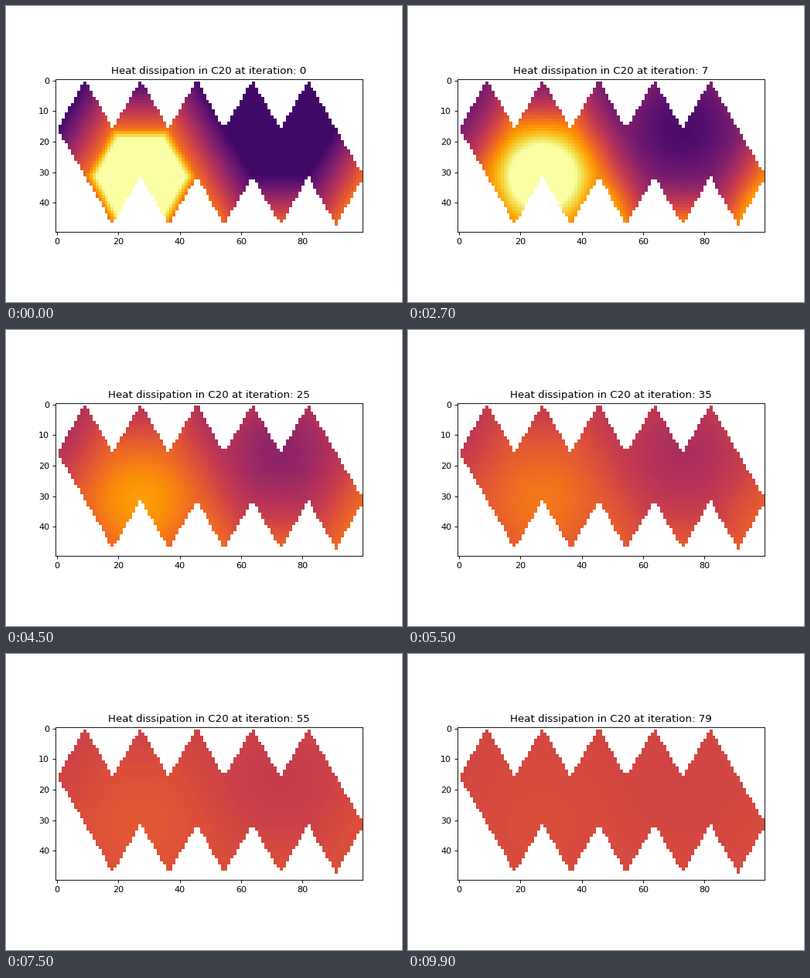
Recreate the animation shown at these times as a matplotlib script. Size 512 px wide and 384 px high, loop 10000 ms.

```python
import numpy as np
import matplotlib.pyplot as plt
from matplotlib.animation import FuncAnimation

COLS, ROWS = 100, 50
FRAMES, HOLD, INTERVAL = 100, 20, 100
EDGE = COLS / 5.5            # side of a face, in cells
TALL = EDGE * np.sqrt(3) / 2
N = 18                       # mesh divisions per side
DIFFUSION = 5.47             # cells squared per iteration
SUBSTEPS = 30

# Corner ids of the icosahedron: two poles and two rings of five.
NORTH, SOUTH = 0, 11
HOT, HOT_RING = 7, (2, 3, 6, 8, SOUTH)


def upper(i):
    return 1 + i % 5


def lower(i):
    return 6 + i % 5


def corner_heat(v):
    if v == HOT:
        return 2.3
    return 0.68 if v in HOT_RING else 0.2


def net_faces():
    """Yield (corner ids, flat corner positions) for the unfolded net."""
    for i in range(5):
        x = i * EDGE
        n = (NORTH, (x + EDGE / 2, 0))
        u0, u1 = (upper(i), (x, TALL)), (upper(i + 1), (x + EDGE, TALL))
        l0 = (lower(i), (x + EDGE / 2, 2 * TALL))
        l1 = (lower(i + 1), (x + EDGE * 1.5, 2 * TALL))
        s = (SOUTH, (x + EDGE, 3 * TALL))
        for face in ((n, u0, u1), (u0, u1, l0), (u1, l0, l1), (l0, l1, s)):
            ids, pos = zip(*face)
            yield ids, np.array(pos)


points = {}


def point_id(ids, weights):
    """Index of a mesh point; shared edges of faces give the same key."""
    key = tuple(sorted((v, int(w)) for v, w in zip(ids, weights) if w > 0))
    return points.setdefault(key, len(points))


UNIT = np.eye(3, dtype=int)
faces = list(net_faces())


def build_neighbours():
    links = {}
    for ids, _ in faces:
        for a in range(N):
            for b in range(N - a):
                base = np.array([a, b, N - 1 - a - b])
                tri = [point_id(ids, base + e) for e in UNIT]
                for p in tri:
                    links.setdefault(p, set()).update(q for q in tri if q != p)
    # Five-way corners are padded with themselves.
    return np.array([(list(links[p]) + [p])[:6] for p in range(len(links))])


def build_sampler():
    """Cells inside the net, with three mesh points and weights for each."""
    inverses = [np.linalg.inv(np.vstack([pos.T, np.ones(3)]))
                for _, pos in faces]
    cells, index, weight = [], [], []
    for r in range(ROWS):
        for c in range(COLS):
            bary = [m @ (c, r, 1) for m in inverses]
            best = max(range(len(faces)), key=lambda k: bary[k].min())
            if bary[best].min() < -1e-9:
                continue
            w = np.clip(bary[best], 1e-7, None)
            w *= N / w.sum()
            base = np.floor(w).astype(int)
            frac = w - base
            if base.sum() == N - 2:
                corners, frac = base + 1 - UNIT, 1 - frac
            else:
                corners = base + UNIT
            cells.append((r, c))
            index.append([point_id(faces[best][0], k) for k in corners])
            weight.append(frac)
    return np.array(cells).T, np.array(index), np.array(weight)


def simulate(steps):
    heat = np.zeros(len(points))
    for key, p in points.items():
        heat[p] = sum(corner_heat(v) * w for v, w in key) / N
    rate = DIFFUSION * 2 / 3 / (EDGE / N) ** 2 / SUBSTEPS
    states = [heat]
    for _ in range(steps):
        for _ in range(SUBSTEPS):
            heat = heat + rate * (heat[neighbours].sum(axis=1) - 6 * heat)
        states.append(heat)
    return states


neighbours = build_neighbours()
(cell_r, cell_c), index, weight = build_sampler()
states = simulate(FRAMES - HOLD)


def picture(step):
    grid = np.full((ROWS, COLS), np.nan)
    grid[cell_r, cell_c] = (states[step][index] * weight).sum(axis=1)
    return grid


fig, ax = plt.subplots(figsize=(6.4, 4.8), dpi=80)
image = ax.imshow(picture(0), cmap="inferno", vmin=0, vmax=1,
                  interpolation="nearest")
title = ax.set_title("")


def update(i):
    image.set_data(picture(max(0, i - HOLD + 1)))
    title.set_text(f"Heat dissipation in C20 at iteration: {max(0, i - HOLD)}")
    return image, title


anim = FuncAnimation(fig, update, frames=FRAMES, interval=INTERVAL,
                     repeat=True, repeat_delay=0, blit=False)
plt.show()
```
